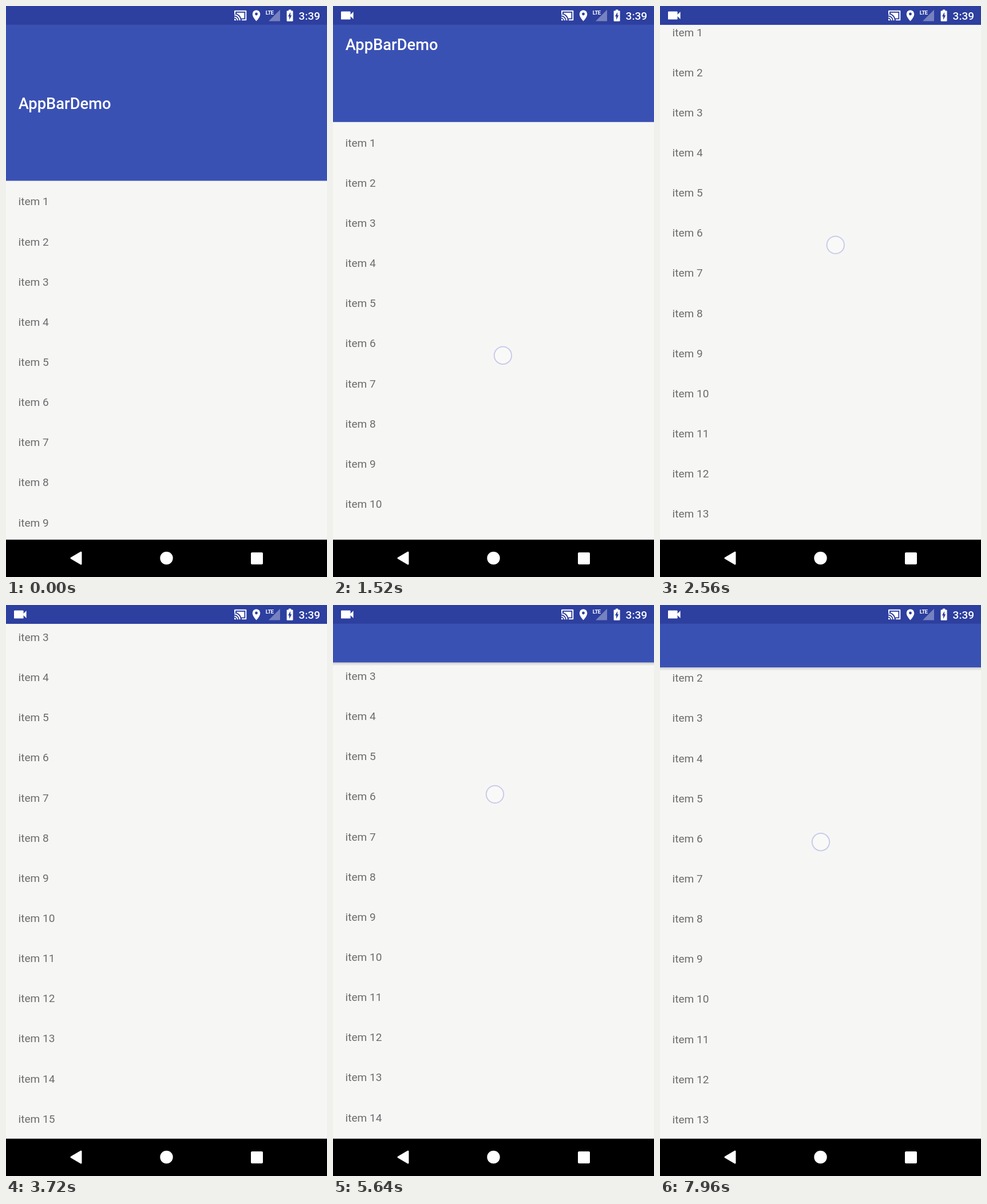
Write an HTML page with a canvas that moves like this. It is 561 px wide and 998 px high and loops after 8 s.

```html
<!DOCTYPE html>
<html lang="en">
<head>
<meta charset="utf-8">
<title>App bar scrolling</title>
<style>
  html, body { margin: 0; width: 100%; height: 100%; overflow: hidden; background: #000; }
  canvas { display: block; }
</style>
</head>
<body>
<canvas id="stage" width="561" height="998"></canvas>
<script>
const ctx = document.getElementById('stage').getContext('2d');
const WIDTH = 561, HEIGHT = 998, STATUS = 32.8, NAV = 932.8, LOOP = 8000;
const OPEN_BOTTOM = 305.5, PINNED_BOTTOM = 109, ROW = 70.14;
const STATUS_COLOR = '#2d3f9f', BAR_COLOR = '#3a51b4', PAGE_COLOR = '#f6f6f5';
const SECOND_DRAG = 4600;

const clamp = (v, lo, hi) => Math.min(hi, Math.max(lo, v));
const ramp = (t, from, to) => clamp((t - from) / (to - from), 0, 1);
const easeOut = (u, power) => 1 - (1 - u) ** power;

// One drag up, then two pulls down.
function listTop(t) {
  return OPEN_BOTTOM
    - 425.7 * easeOut(ramp(t, 1040, 3640), 1.35)
    + 76 * easeOut(ramp(t, 4740, 6240), 2.46)
    + 65.4 * ramp(t, 6360, 7640) ** 2;
}

// The bar follows the list up, and comes back only to its pinned height.
function barBottom(t, top) {
  return t < SECOND_DRAG
    ? clamp(top, STATUS, OPEN_BOTTOM)
    : clamp(top + 152.6, STATUS, PINNED_BOTTOM);
}

// The finger travels a little before the list begins to follow.
function finger(t, top) {
  if (t >= SECOND_DRAG) {
    const lead = 11 * ramp(t, 4600, 4740) + 10 * ramp(t, 5640, 6240);
    return { x: 283 - 2 * ramp(t, 6800, 7960), y: top + 372 + lead };
  }
  if (t < 1000 || t >= 3700) return null;
  return { x: 292 + 25 * ramp(t, 1000, 3640), y: top + 419 - 11 * ramp(t, 1000, 1070) };
}

function rect(color, x, y, w, h) {
  ctx.fillStyle = color;
  ctx.fillRect(x, y, w, h);
}

function text(str, x, y, font, color = '#fff') {
  ctx.font = `${font} Roboto, sans-serif`;
  ctx.fillStyle = color;
  ctx.fillText(str, x, y);
}

function disc(x, y, r) {
  ctx.beginPath();
  ctx.arc(x, y, r, 0, Math.PI * 2);
  ctx.fill();
}

function box(x, y, w, h, radius) {
  ctx.beginPath();
  ctx.roundRect(x, y, w, h, radius);
  ctx.fill();
}

function polygon(...points) {
  ctx.beginPath();
  points.forEach(([x, y]) => ctx.lineTo(x, y));
  ctx.closePath();
  ctx.fill();
}

function drawList(top) {
  rect(PAGE_COLOR, 0, STATUS, WIDTH, NAV - STATUS);
  for (let n = 1; n <= 16; n++) {
    text(`item ${n}`, 21.6, top + 42.9 + (n - 1) * ROW, '19.1px', '#6c6c6c');
  }
}

function drawAppBar(bottom) {
  if (bottom <= STATUS) return;
  if (bottom <= PINNED_BOTTOM) {
    const shadow = ctx.createLinearGradient(0, bottom, 0, bottom + 6);
    shadow.addColorStop(0, 'rgba(0,0,0,.17)');
    shadow.addColorStop(1, 'rgba(0,0,0,0)');
    rect(shadow, 0, bottom, WIDTH, 6);
  }
  rect(BAR_COLOR, 0, STATUS, WIDTH, bottom - STATUS);
  text('AppBarDemo', 21.8, bottom - 125.5, '500 27.3px');
}

function drawCamera() {
  box(14, 9.4, 16.6, 14.2, 1.2);
  polygon([29, 16.5], [35.6, 9.9], [35.6, 23.1]);
}

function drawCast() {
  ctx.lineWidth = 2;
  ctx.beginPath();
  ctx.moveTo(400, 14);
  ctx.lineTo(400, 8.8);
  ctx.lineTo(419.3, 8.8);
  ctx.lineTo(419.3, 24.3);
  ctx.lineTo(412, 24.3);
  ctx.stroke();
  for (const radius of [1.5, 5.8, 9.7]) {
    ctx.lineWidth = radius < 2 ? 3 : 2;
    ctx.beginPath();
    ctx.arc(399, 25.3, radius, -Math.PI / 2, 0);
    ctx.stroke();
  }
  ctx.beginPath();
  ctx.moveTo(416.4, 11.7);
  ctx.lineTo(403, 11.7);
  ctx.lineTo(403, 13.3);
  ctx.quadraticCurveTo(409, 15.4, 411, 21.4);
  ctx.lineTo(416.4, 21.4);
  ctx.fill();
}

function drawPin() {
  const x = 437.5, y = 14, r = 6.8;
  ctx.beginPath();
  ctx.arc(x, y, r, Math.PI, 0);
  ctx.quadraticCurveTo(x + r, y + 5, x, y + 12.6);
  ctx.quadraticCurveTo(x - r, y + 5, x - r, y);
  ctx.fill();
  ctx.fillStyle = STATUS_COLOR;
  disc(x, y, 2.4);
}

function drawBattery() {
  const x = 496.1, y = 17.2;
  ctx.fillStyle = '#fff';
  box(x - 5.5, y - 8.9, 11, 18.4, 1.3);
  box(x - 2.2, y - 10.8, 4.4, 3, 0);
  ctx.fillStyle = STATUS_COLOR;
  polygon([x - 1, y + 7], [x - 1, y + 1], [x - 3.2, y + 1], [x + 1, y - 6.5], [x + 1, y - 1], [x + 3.2, y - 1]);
}

function drawStatus(t) {
  rect(STATUS_COLOR, 0, 0, WIDTH, STATUS);
  ctx.fillStyle = ctx.strokeStyle = '#fff';
  if (t >= 80) {
    ctx.globalAlpha = ramp(t, 40, 240);
    drawCamera();
    ctx.globalAlpha = 1;
  }
  drawCast();
  drawPin();
  ctx.fillStyle = 'rgba(255,255,255,.35)';
  polygon([459, 26.5], [479, 6.5], [479, 26.5]);
  ctx.letterSpacing = '-0.6px';
  text('LTE', 453.8, 15.2, 'bold condensed 9.5px');
  ctx.letterSpacing = '0px';
  drawBattery();
  text('3:39', 511.6, 23.8, '500 19.1px');
}

function drawNavigation() {
  rect('#000', 0, NAV, WIDTH, HEIGHT - NAV);
  ctx.fillStyle = ctx.strokeStyle = '#fff';
  ctx.lineWidth = 3;
  ctx.lineJoin = 'round';
  polygon([114, 965], [131, 955], [131, 975]);
  ctx.stroke();
  disc(280.5, 965, 11.2);
  box(428, 955, 21, 21, 2);
}

function drawTouch({ x, y }) {
  ctx.fillStyle = 'rgba(255,255,255,.35)';
  ctx.strokeStyle = '#cacbea';
  ctx.lineWidth = 2;
  disc(x, y, 15.2);
  ctx.stroke();
}

function draw(t) {
  const top = listTop(t);
  const touch = finger(t, top);
  drawList(top);
  drawAppBar(barBottom(t, top));
  drawStatus(t);
  drawNavigation();
  if (touch) drawTouch(touch);
}

const start = performance.now();
function tick() {
  draw((performance.now() - start) % LOOP);
  requestAnimationFrame(tick);
}
tick();
</script>
</body>
</html>
```
